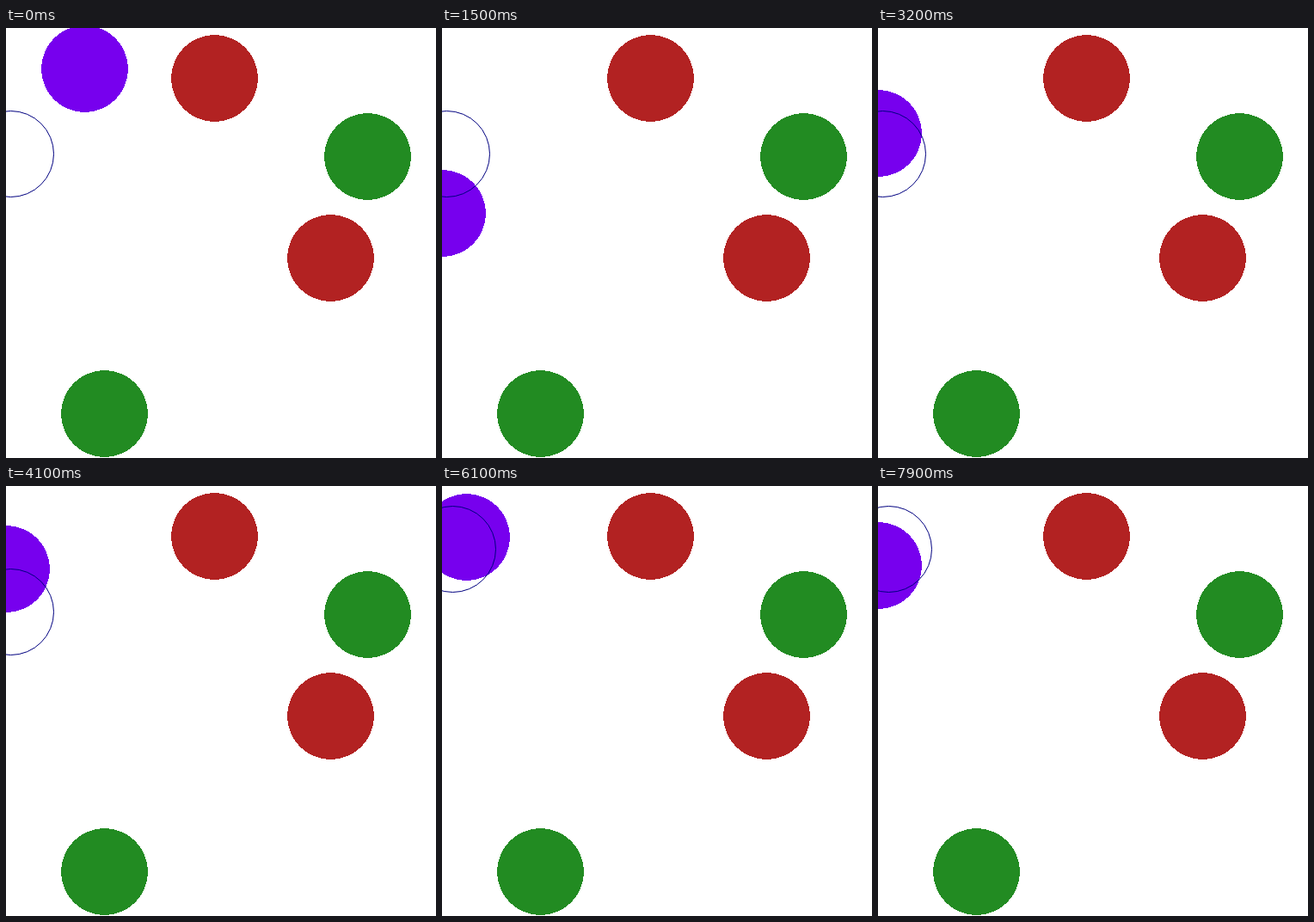
Animation of 500 by 500 pixels, one loop 8000 ms. Source, as an HTML page with a canvas:

```html
<!DOCTYPE html>
<html lang="en">
<head>
<meta charset="utf-8">
<title>Circles</title>
<style>
  html, body { margin: 0; width: 100%; height: 100%; overflow: hidden; background: #fff; }
  canvas { display: block; }
</style>
</head>
<body>
<canvas id="stage" width="500" height="500"></canvas>
<script>
const ctx = document.getElementById("stage").getContext("2d");
const LOOP = 8000, STEP = 100, R = 50;
const SUB = 10;           // physics updates per step
const PULL = 0.0254;      // spring strength towards the goal
const DRAG = 0.00163;     // drag gained per step

const still = [
  { x: 242, y: 58, color: "#b22222" },
  { x: 377, y: 267, color: "#b22222" },
  { x: 420, y: 149, color: "#228b22" },
  { x: 114, y: 448, color: "#228b22" }
];

// Each goal appears at a step and gives the ball a new speed;
// drag builds up from the step "fresh"
const goals = [
  { from: 0, x: 5, y: 146, vx: -0.83, vy: 1.15, fresh: 0 },
  { from: 41.9, x: 20, y: 66, vx: 2.1, vy: -1.6, fresh: 0 },
  { from: 59, x: 12, y: 73, vx: -1, vy: 3.3, fresh: 59 }
];

const goalAt = n => goals.filter(g => g.from <= n).pop();

// The ball swings around the goal and is stopped by the left wall
function swing() {
  const poses = [], dt = 1 / SUB;
  let x = 91, y = 47, vx = 0, vy = 0, last;
  for (let i = 0; i < LOOP / STEP * SUB; i++) {
    const n = i / SUB, goal = goalAt(n);
    if (goal !== last) ({ vx, vy } = last = goal);
    if (i % SUB === 0) poses.push({ x: Math.round(x), y: Math.round(y), goal });
    const drag = DRAG * (n - goal.fresh);
    vx += (PULL * (goal.x - x) - drag * vx) * dt;
    vy += (PULL * (goal.y - y) - drag * vy) * dt;
    x = Math.max(0, x + vx * dt);
    y += vy * dt;
  }
  return poses;
}

// Filled with whole pixel rows to keep the edge hard
function disc(x, y, color) {
  ctx.fillStyle = color;
  for (let dy = -R; dy <= R; dy++) {
    const half = Math.floor(Math.sqrt((R + 0.25) ** 2 - dy * dy));
    ctx.fillRect(x - half, y + dy, 2 * half + 1, 1);
  }
}

function ring(x, y, color) {
  ctx.strokeStyle = color;
  ctx.lineWidth = 1;
  ctx.beginPath();
  ctx.arc(x + 0.5, y + 0.5, R, 0, 2 * Math.PI);
  ctx.stroke();
}

function draw({ x, y, goal }) {
  ctx.fillStyle = "#fff";
  ctx.fillRect(0, 0, 500, 500);
  still.forEach(c => disc(c.x, c.y, c.color));
  disc(x, y, "#7700ee");
  ring(goal.x, goal.y, "#000080");
}

const poses = swing();
const start = performance.now();
function tick() {
  const t = (performance.now() - start) % LOOP;
  draw(poses[Math.floor(t / STEP)]);
  requestAnimationFrame(tick);
}
tick();
</script>
</body>
</html>
```
